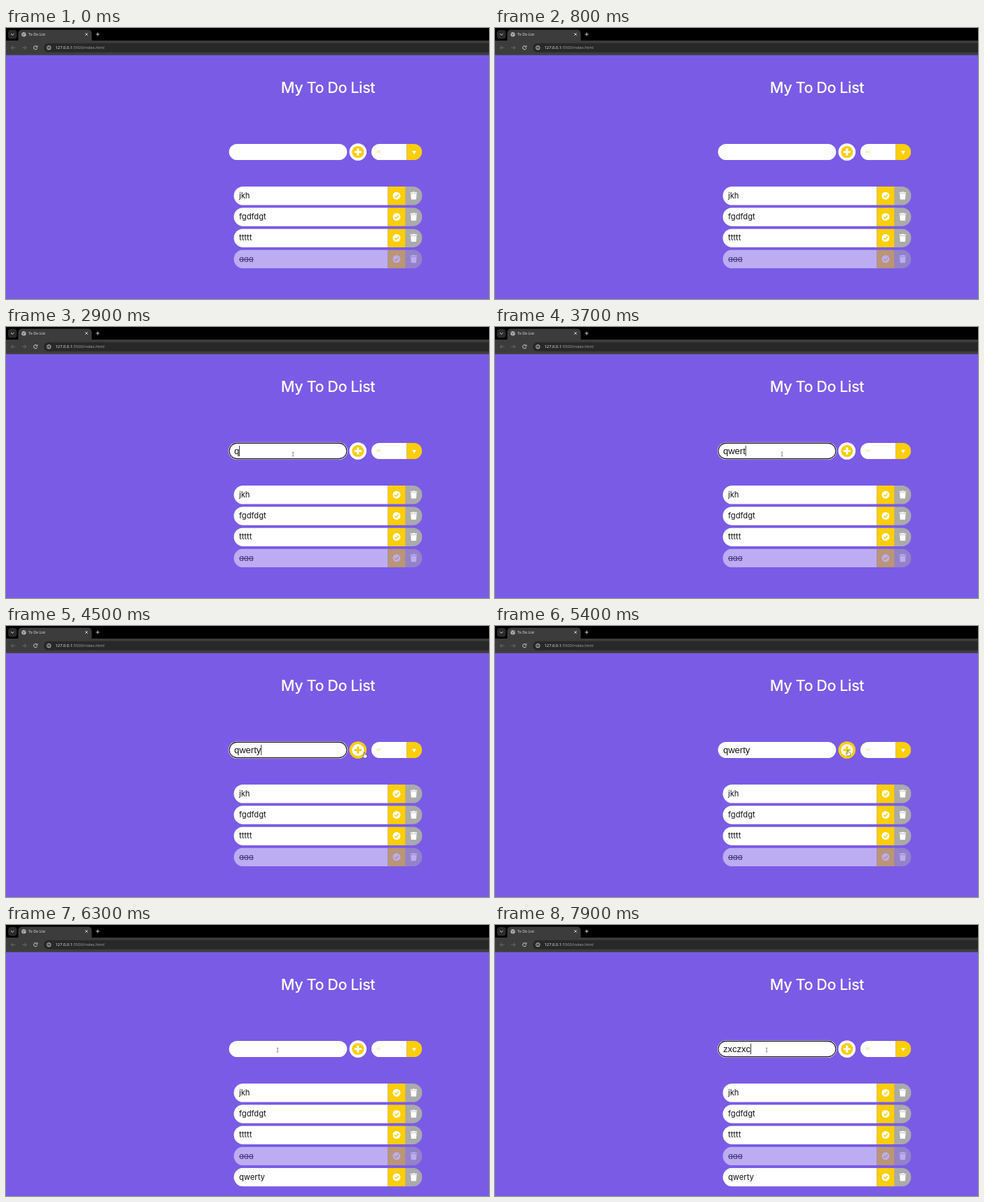
Animation, 690 px wide and 388 px high, one loop 8000 ms. Source, as an HTML page with a canvas:

```html
<!DOCTYPE html>
<html lang="en">
<head>
<meta charset="utf-8">
<title>To Do List</title>
<style>
  html, body { margin: 0; width: 100%; height: 100%; overflow: hidden; background: #7a5be6; }
  canvas { position: absolute; left: 0; top: 0; width: 690px; height: 388px; }
  .label {
    position: absolute; left: 333px; height: 26px; line-height: 26px; color: #111;
    font: 400 11.2px/26px Inter, sans-serif; font-feature-settings: "cv11"; white-space: pre;
  }
  .done { color: #43337c; text-decoration: line-through; }
</style>
</head>
<body>
<canvas id="stage"></canvas>
<script>
const LOOP = 8000, W = 690, H = 388;
const PURPLE = "#7a5be6", YELLOW = "#fbce06", WHITE = "#fff", INK = "#111";
const LIVE = { paper: WHITE, check: YELLOW, bin: "#aaa" };
const DONE = { paper: "#bcadf2", check: "#ba9576", bin: "#9282c8" };
const ITEMS = ["jkh", "fgdfdgt", "ttttt", "aaa", "qwerty"];
const DONE_INDEX = 3, ADDED_AT = 5500;
const BUTTON = { x: 502.8, y: 177.5, r: 12.3 };

// [time, input text, focused]
const TYPING = [
  [0, "", false], [2300, "", true], [2800, "q", true], [3100, "qw", true],
  [3400, "qwer", true], [3700, "qwert", true], [4200, "qwerty", true],
  [5300, "qwerty", false], [ADDED_AT, "", false], [6400, "", true],
  [7300, "z", true], [7400, "zx", true], [7500, "zxc", true],
  [7700, "zxcz", true], [7800, "zxczx", true], [7900, "zxczxc", true]
];

// [time, x, y]
const POINTER = [
  [1100, 692, 222], [1500, 410, 182], [4200, 410, 182], [4500, 512, 181],
  [4800, 504, 178], [5900, 504, 178], [6300, 388, 179], [LOOP, 388, 179]
];

const canvas = document.getElementById("stage");
const ctx = canvas.getContext("2d");
const ratio = window.devicePixelRatio || 1;
canvas.width = W * ratio;
canvas.height = H * ratio;
ctx.scale(ratio, ratio);

const rowTop = i => 227 + i * 30.2;
const labels = ITEMS.map((text, i) => {
  const el = document.createElement("div");
  el.className = i === DONE_INDEX ? "label done" : "label";
  el.textContent = text;
  el.style.top = rowTop(i) + "px";
  document.body.append(el);
  return el;
});

function rect(x, y, w, h, color) {
  ctx.fillStyle = color;
  ctx.fillRect(x, y, w, h);
}

function pill(x, y, w, h, r, color) {
  ctx.beginPath();
  ctx.roundRect(x, y, w, h, r);
  ctx.fillStyle = color;
  ctx.fill();
}

function circle(x, y, r, color) {
  ctx.beginPath();
  ctx.arc(x, y, r, 0, Math.PI * 2);
  ctx.fillStyle = color;
  ctx.fill();
}

function line(points, color, width) {
  ctx.beginPath();
  points.forEach(([x, y]) => ctx.lineTo(x, y));
  ctx.strokeStyle = color;
  ctx.lineWidth = width;
  ctx.stroke();
}

function ring(x, y, r, color, width, from = 0, to = Math.PI * 2) {
  ctx.beginPath();
  ctx.arc(x, y, r, from, to);
  ctx.strokeStyle = color;
  ctx.lineWidth = width;
  ctx.stroke();
}

function write(text, x, y, font, color) {
  ctx.font = font;
  ctx.fillStyle = color;
  ctx.fillText(text, x, y);
  return ctx.measureText(text).width;
}

function plus(x, y, arm, width, color) {
  line([[x - arm, y], [x + arm, y]], color, width);
  line([[x, y - arm], [x, y + arm]], color, width);
}

function drawArrow(x, dir) {
  line([[x - 3 * dir, 28.2], [x + 3 * dir, 28.2]], "#777", 0.8);
  line([[x + 0.3 * dir, 25.5], [x + 3 * dir, 28.2], [x + 0.3 * dir, 30.9]], "#777", 0.8);
}

function drawBrowser() {
  rect(0, 0, W, 39, "#000");
  pill(3, 3, 12.5, 12.5, 4, "#2b2b2b");
  line([[7, 8.2], [9.2, 10.3], [11.4, 8.2]], "#ddd", 1);
  pill(17.5, 2.5, 105, 20, 5, "#3c3c3c");
  rect(0, 18, W, 21, "#3c3c3c");
  rect(0, 37.5, W, 1.2, "#484848");

  circle(25.5, 9.2, 3.2, "#b5b5b5");
  line([[23.2, 8], [25.5, 9], [25, 11.5]], "#555", 0.9);
  line([[26.5, 6.7], [27.8, 9.3]], "#555", 0.8);
  write("To Do List", 32, 11.2, '5.3px "Open Sans", sans-serif', "#eee");
  line([[113.2, 7.2], [116.8, 10.8]], "#ddd", 0.9);
  line([[116.8, 7.2], [113.2, 10.8]], "#ddd", 0.9);
  plus(131, 9, 2.5, 0.9, "#ddd");

  drawArrow(10.3, -1);
  drawArrow(26, 1);
  ring(42.2, 28.2, 2.6, "#ddd", 0.9, 0.3, 5.5);
  line([[44.9, 25.2], [44.9, 27.4], [42.8, 27.4]], "#ddd", 0.8);

  pill(54, 21.8, 660, 13, 6.5, "#282828");
  ring(61.3, 28.3, 2.7, "#e6e6e6", 0.9);
  line([[61.3, 27.7], [61.3, 29.9]], "#e6e6e6", 0.8);
  line([[61.3, 26.5], [61.3, 27.2]], "#e6e6e6", 0.8);
  const font = '5.8px "Open Sans", sans-serif';
  const width = write("127.0.0.1", 70.5, 30.4, font, "#f0f0f0");
  write(":5500/index.html", 70.5 + width, 30.4, font, "#a6a6a6");
}

function drawTitle() {
  ctx.textAlign = "center";
  ctx.letterSpacing = "-0.4px";
  write("My To Do List", 460, 93, "500 21.5px Inter, sans-serif", WHITE);
  ctx.letterSpacing = "0px";
  ctx.textAlign = "left";
}

function drawInput(time) {
  const [since, text, focused] = TYPING.findLast(step => step[0] <= time);
  pill(318.6, 166, 168.6, 23, 11.5, WHITE);
  if (focused) {
    pill(317.8, 165.2, 170.2, 24.6, 12.3, WHITE);
    ctx.beginPath();
    ctx.roundRect(319, 166.4, 167.8, 22.2, 11.1);
    ctx.strokeStyle = INK;
    ctx.lineWidth = 1.1;
    ctx.stroke();
  }
  const width = write(text, 326, 182, '13px "Liberation Sans", Arial, sans-serif', INK);
  if (focused && (time - since) % 1100 < 500) rect(326 + width, 170, 0.8, 15, INK);
}

function drawButton(hot) {
  const [outer, inner] = hot ? [YELLOW, WHITE] : [WHITE, YELLOW];
  circle(BUTTON.x, BUTTON.y, BUTTON.r, outer);
  circle(BUTTON.x, BUTTON.y, 8.6, inner);
  plus(BUTTON.x, BUTTON.y, 5, 3, outer);
}

function drawFilter() {
  ctx.save();
  ctx.beginPath();
  ctx.roundRect(522, 166, 72.3, 23, 11.5);
  ctx.clip();
  rect(522, 166, 50.5, 23, WHITE);
  rect(572.5, 166, 22, 23, YELLOW);
  ctx.restore();
  write("All", 529.2, 179, "5px Inter, sans-serif", "#f9d95c");
  ctx.beginPath();
  ctx.moveTo(580.2, 176);
  ctx.lineTo(586, 176);
  ctx.lineTo(583.1, 181);
  ctx.fillStyle = WHITE;
  ctx.fill();
}

function drawBin(x, y, color) {
  rect(x - 4.8, y - 5, 9.6, 1.4, color);
  rect(x - 1.6, y - 5.7, 3.2, 1, color);
  ctx.beginPath();
  ctx.moveTo(x - 4.2, y - 2.9);
  ctx.lineTo(x + 4.2, y - 2.9);
  ctx.lineTo(x + 3.6, y + 5.4);
  ctx.lineTo(x - 3.6, y + 5.4);
  ctx.fillStyle = color;
  ctx.fill();
}

function drawItem(i) {
  const y = rowTop(i), mid = y + 13.2;
  const { paper, check, bin } = i === DONE_INDEX ? DONE : LIVE;
  ctx.save();
  ctx.beginPath();
  ctx.roundRect(325.5, y, 269, 26.5, 13.2);
  ctx.clip();
  rect(325, y, 220.5, 27, paper);
  rect(545.5, y, 25.3, 27, check);
  rect(570.8, y, 24, 27, bin);
  ctx.restore();
  circle(558, mid, 5.5, paper);
  line([[555.2, mid + 0.1], [557.3, mid + 2.1], [560.9, mid - 1.8]], check, 1.4);
  drawBin(582.4, mid, paper);
}

function pointerAt(time) {
  const next = POINTER.findIndex(key => key[0] > time);
  if (next < 1) return null;
  const [t0, x0, y0] = POINTER[next - 1], [t1, x1, y1] = POINTER[next];
  const p = (time - t0) / (t1 - t0), e = p * p * (3 - 2 * p);
  return { x: x0 + (x1 - x0) * e, y: y0 + (y1 - y0) * e };
}

function drawBeam(x, y) {
  line([[x, y - 2.6], [x, y + 2.6]], "#555", 0.7);
  for (const dy of [-2.8, 2.8]) line([[x - 1.3, y + dy], [x + 1.3, y + dy]], "#555", 0.6);
}

function drawShape(x, y, points) {
  ctx.beginPath();
  points.forEach(([dx, dy]) => ctx.lineTo(x + dx, y + dy));
  ctx.closePath();
  ctx.fillStyle = WHITE;
  ctx.fill();
  ctx.strokeStyle = "#333";
  ctx.lineWidth = 0.5;
  ctx.stroke();
}

const HAND = [[-0.7, 0], [0.7, 0], [0.8, 2.8], [3.6, 3.4], [3.8, 5.5], [2.9, 8], [-0.6, 8], [-2.6, 5.2], [-2, 4.4], [-0.7, 5.2]];
const ARROW = [[0, 0], [0, 7], [1.6, 5.6], [2.7, 8], [3.7, 7.5], [2.7, 5.2], [4.8, 5]];

function drawPointer({ x, y }, hot) {
  const overInput = x > 319 && x < 487 && y > 166 && y < 189;
  if (hot) drawShape(x, y, HAND);
  else if (overInput) drawBeam(x, y);
  else drawShape(x, y, ARROW);
}

function render(now) {
  const time = now % LOOP;
  const pointer = pointerAt(time);
  const hot = !!pointer && Math.hypot(pointer.x - BUTTON.x, pointer.y - BUTTON.y) < BUTTON.r;
  const count = time >= ADDED_AT ? ITEMS.length : ITEMS.length - 1;

  rect(0, 0, W, H, PURPLE);
  drawBrowser();
  drawTitle();
  drawInput(time);
  drawButton(hot);
  drawFilter();
  labels.forEach((el, i) => {
    el.style.display = i < count ? "block" : "none";
    if (i < count) drawItem(i);
  });
  if (pointer) drawPointer(pointer, hot);
}

const start = performance.now();
function tick() {
  render(performance.now() - start);
  requestAnimationFrame(tick);
}
tick();
</script>
</body>
</html>
```
